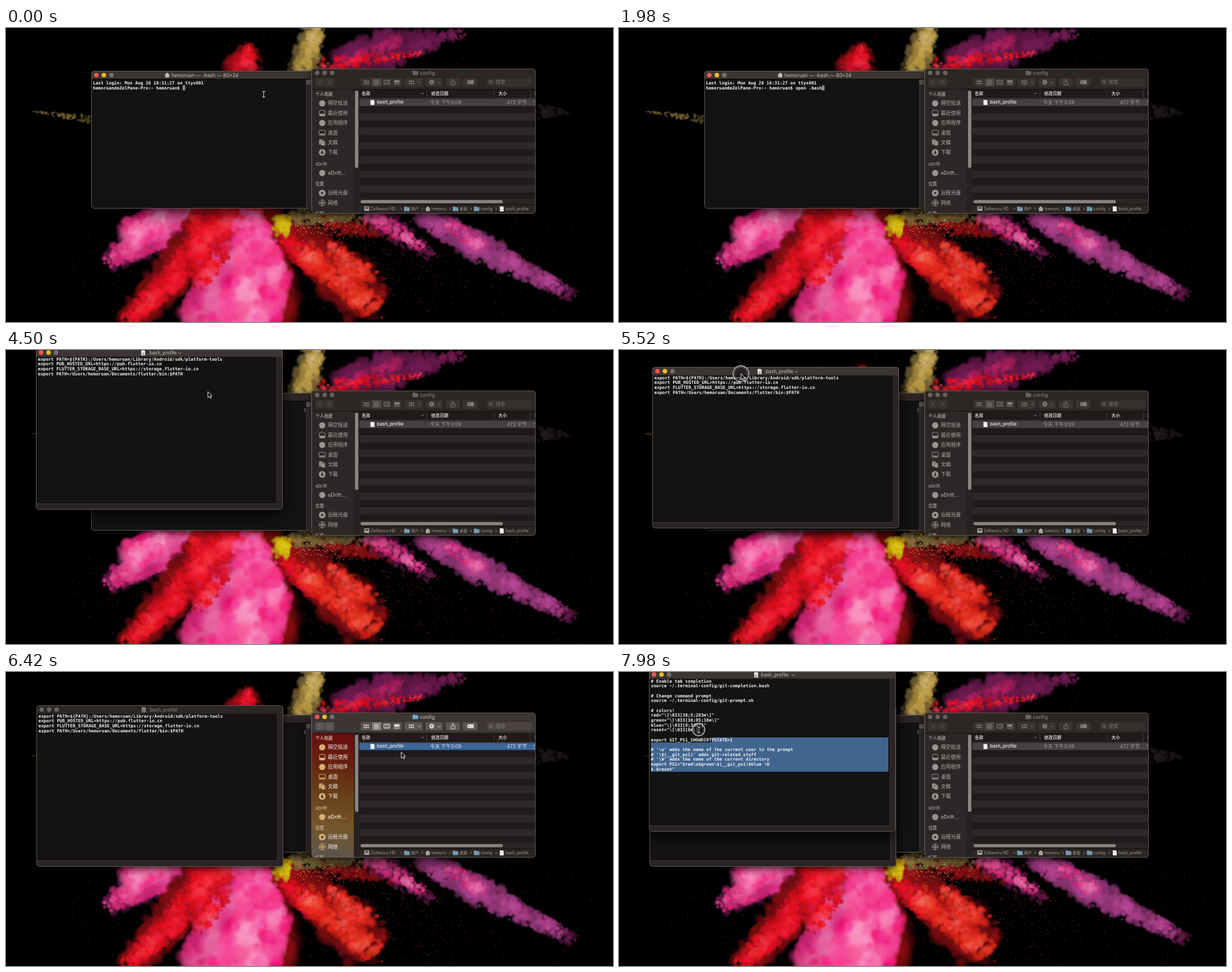
These frames come from a looping animation (1075 by 521 pixels, 8000 ms). An HTML page with a canvas:

```html
<!DOCTYPE html>
<html lang="zh">
<head>
<meta charset="utf-8">
<title>Terminal profile</title>
<style>
html, body { margin: 0; width: 100%; height: 100%; overflow: hidden; background: #000; }
canvas { display: block; }
</style>
</head>
<body>
<canvas id="stage" width="1075" height="521"></canvas>
<script>
const stage = document.getElementById('stage');
let ctx = stage.getContext('2d');
const LOOP = 8000, STEP = 60;
const UI = 'Inter, "Noto Sans CJK SC", "Noto Sans CJK", sans-serif';
const MONO = '"DejaVu Sans Mono", monospace';
const CHAR = 4.667, LINE = 8.67;
const USER = 'hemoruan';
const PROMPT = `${USER}deZelPane-Pro:~ ${USER}$ `;
const COMMAND = 'open .bash_profile';

const SHELL_LINES = [
  `export PATH=\${PATH}:/Users/${USER}/Library/Android/sdk/platform-tools`,
  'export PUB_HOSTED_URL=https://pub.flutter-io.cn',
  'export FLUTTER_STORAGE_BASE_URL=https://storage.flutter-io.cn',
  `export PATH=/Users/${USER}/Documents/flutter/bin:$PATH`
];
const CONFIG_LINES = String.raw`# Enable tab completion
source ~/.terminal-config/git-completion.bash

# Change command prompt
source ~/.terminal-config/git-prompt.sh

# colors!
red="\[\033[38;5;203m\]"
green="\[\033[38;05;38m\]"
blue="\[\033[0;34m\]"
reset="\[\033[0m\]"

export GIT_PS1_SHOWDIRTYSTATE=1

# '\u' adds the name of the current user to the prompt
# '\$(__git_ps1)' adds git-related stuff
# '\W' adds the name of the current directory
export PS1="$red\u$green\$(__git_ps1)$blue \W
$ $reset"`.split('\n');

// Drawing helpers
function rect(x, y, w, h, color, r = 0) {
  ctx.fillStyle = color;
  ctx.beginPath();
  ctx.roundRect(x, y, w, h, r);
  ctx.fill();
}
function frame(x, y, w, h, color, r = 0, lw = 1) {
  ctx.strokeStyle = color;
  ctx.lineWidth = lw;
  ctx.beginPath();
  ctx.roundRect(x, y, w, h, r);
  ctx.stroke();
}
function disc(x, y, r, color) {
  ctx.fillStyle = color;
  ctx.beginPath();
  ctx.arc(x, y, r, 0, 7);
  ctx.fill();
}
function ring(x, y, r, color, lw = 1) {
  ctx.strokeStyle = color;
  ctx.lineWidth = lw;
  ctx.beginPath();
  ctx.arc(x, y, r, 0, 7);
  ctx.stroke();
}
function path(points, x, y, fill, stroke, lw = 1) {
  ctx.beginPath();
  for (let i = 0; i < points.length; i += 2) ctx.lineTo(x + points[i], y + points[i + 1]);
  if (fill) { ctx.closePath(); ctx.fillStyle = fill; ctx.fill(); }
  if (stroke) { ctx.strokeStyle = stroke; ctx.lineWidth = lw; ctx.stroke(); }
}
function text(s, x, y, color, size = 9, weight = 400, family = UI) {
  ctx.font = `${weight} ${size}px ${family}`;
  ctx.textBaseline = 'middle';
  ctx.fillStyle = color;
  ctx.fillText(s, x, y);
}
const code = (s, x, y, color = '#f2f2f2') => text(s, x, y, color, 7.75, 700, MONO);
function page(x, y, color = '#eee') {
  rect(x - 3.5, y - 4.5, 7, 9, color, [0, 2.5, 0, 0]);
}
function folder(x, y, color = '#7398aa') {
  rect(x - 5, y - 4, 5, 3, color, 1);
  rect(x - 5, y - 3, 10, 7, color, 1);
}
function house(x, y, color = '#b4aeab') {
  path([-5, 0, 0, -4.5, 5, 0], x, y, color);
  rect(x - 3.5, y, 7, 4, color);
}
function drive(x, y) {
  rect(x - 4.5, y - 4.5, 9, 8, '#aaa6a4', 1);
  rect(x - 3, y - 3.5, 6, 3.5, '#55504e');
}
function chevron(x, y, color, turn = 0, s = 2.5) {
  ctx.save();
  ctx.translate(x, y);
  ctx.rotate(turn * Math.PI / 2);
  path([-s, -s / 2, 0, s / 2, s, -s / 2], 0, 0, null, color);
  ctx.restore();
}

// Coloured powder wallpaper, drawn once
let seed = 11;
const rnd = () => (seed = seed * 16807 % 2147483647) / 2147483647;
const mix = (a, b, k) => a + (b - a) * k;
const RED = [355, 88, 49], CORAL = [4, 82, 53], DARK = [358, 82, 28];
const PINK = [333, 88, 67], ROSE = [333, 70, 57], PURPLE = [318, 46, 43], WINE = [322, 62, 25];
const YELLOW = [52, 86, 46], SAND = [43, 48, 53], OLIVE = [42, 38, 34], SMOKE = [340, 15, 11];

// Puffs between two points, spread w to w2: cloudy inside, darker and ragged at the rim
function plume([h, s, l], x, y, x2, y2, w, w2) {
  const n = 40 + Math.hypot(x2 - x, y2 - y) * (w + w2) / 28;
  for (let i = 0; i < n; i++) {
    const k = rnd(), r = mix(w, w2, k), a = rnd() * 6.283, d = Math.sqrt(rnd());
    const px = mix(x, x2, k) + r * d * Math.cos(a), py = mix(y, y2, k) + r * d * Math.sin(a);
    const size = 1.5 + r * (.1 + .3 * rnd()) * (1.3 - .6 * d);
    const cloud = Math.sin(px / 13 + py / 29) * Math.sin(py / 16 - px / 37);
    const tone = `${h + rnd() * 8 - 4} ${s}% ${l * (1.12 - .32 * d * d + .14 * cloud)}%`;
    const g = ctx.createRadialGradient(px, py, 0, px, py, size);
    g.addColorStop(0, `hsl(${tone} / .7)`);
    g.addColorStop(.5, `hsl(${tone} / .5)`);
    g.addColorStop(1, `hsl(${tone} / 0)`);
    disc(px, py, size, g);
  }
}
function specks(n, x, y, w, h, hue, light) {
  for (let i = 0; i < n; i++) {
    const s = .5 + rnd() * .9;
    const px = x + w * (rnd() + rnd() - 1), py = y + h * (rnd() + rnd() - 1);
    rect(px, py, s, s, `hsl(${hue + rnd() * 20} 65% ${light * (.5 + rnd() * .7)}%)`);
  }
}
function paintWallpaper() {
  const layer = document.createElement('canvas'), main = ctx;
  layer.width = 1075;
  layer.height = 521;
  ctx = layer.getContext('2d');
  rect(0, 0, 1075, 521, '#000');
  specks(800, 780, 420, 280, 150, 345, 32);
  specks(400, 600, 35, 330, 80, 335, 28);
  specks(300, 190, 430, 150, 100, 350, 28);

  plume(DARK, 420, 78, 428, 40, 42, 14);
  plume(RED, 420, 74, 430, 32, 30, 6);
  plume(WINE, 590, 70, 690, 30, 32, 38);
  plume(WINE, 690, 35, 808, 10, 32, 8);
  plume(ROSE.map((v, i) => i === 2 ? 38 : v), 600, 60, 700, 22, 12, 14);
  plume(RED, 562, 68, 735, 44, 17, 5);
  plume(OLIVE, 548, -4, 525, 78, 22, 28);
  plume(SAND, 554, -4, 524, 78, 15, 20);
  plume(OLIVE, 47, 147, 152, 163, 2, 9);
  plume(SMOKE, 945, 148, 995, 150, 14, 6);

  plume(WINE, 300, 340, 190, 410, 42, 22);
  plume(ROSE, 340, 325, 215, 375, 34, 38);
  plume(ROSE, 300, 345, 185, 412, 40, 14);
  plume(PINK, 270, 335, 230, 365, 25, 24);
  plume(DARK, 460, 330, 420, 515, 32, 95);
  plume(DARK, 385, 335, 225, 515, 48, 28);
  plume(ROSE, 390, 400, 365, 525, 40, 58);
  plume(RED, 440, 328, 340, 345, 22, 28);
  plume(RED, 390, 340, 215, 525, 34, 17);
  plume(PINK, 430, 345, 460, 450, 30, 48);
  plume(PINK, 455, 425, 420, 525, 48, 58);
  plume(RED, 385, 390, 345, 450, 18, 16);

  plume(DARK, 500, 350, 630, 470, 22, 58);
  plume(DARK, 560, 345, 690, 365, 20, 12);
  plume(RED, 490, 375, 560, 430, 16, 26);
  plume(CORAL, 530, 395, 650, 495, 22, 24);
  plume(CORAL, 575, 390, 640, 440, 15, 22);
  plume(WINE, 650, 330, 755, 405, 28, 10);
  plume(ROSE, 645, 330, 740, 388, 18, 9);
  plume(WINE, 735, 330, 1000, 472, 26, 14);
  plume(PURPLE, 735, 330, 860, 400, 18, 30);
  plume(PURPLE, 850, 398, 990, 465, 26, 12);
  plume(ROSE, 780, 345, 840, 385, 10, 15);
  plume(OLIVE, 510, 332, 625, 335, 18, 14);
  plume(YELLOW, 485, 338, 490, 358, 19, 16);
  specks(260, 560, 345, 80, 35, 35, 75);
  specks(420, 610, 420, 160, 100, 0, 48);
  ctx = main;
  return layer;
}
const wallpaper = paintWallpaper();

// Windows
const EDGE = '#625a57';
function windowBox(x, y, w, h, active, bar) {
  ctx.save();
  ctx.shadowColor = 'rgba(0,0,0,.75)';
  ctx.shadowBlur = active ? 26 : 14;
  ctx.shadowOffsetY = active ? 9 : 4;
  rect(x, y, w, h, '#141213', 5);
  ctx.restore();
  rect(x, y, w, bar, active ? '#3c3533' : '#2c2624', [5, 5, 0, 0]);
}
function windowTop(x, y, w, h, active, dx = 9) {
  const colors = active ? ['#fb5850', '#e8bd28', '#76706e'] : Array(3).fill('#68615f');
  colors.forEach((c, i) => disc(x + dx + i * 13.3, y + 7.5, 4, c));
  frame(x + .5, y + .5, w - 1, h - 1, EDGE, 5);
}
function terminal(t) {
  const active = t < 3600, done = t >= 3360, x = 151, y = 76;
  windowBox(x, y, 390, 244, active, 14);
  rect(x, 90, 390, 1, '#090808');
  rect(531, 91, 9, 228, '#302c2b');
  frame(532.5, 92.5, 7, 7, '#777170', 1);
  for (let i = 0; i < 3; i++) rect(534, 94.3 + i * 1.8, 4, .8, '#aaa');
  windowTop(x, y, 390, 244, active);
  const c = active ? '#c9c3c0' : '#8d8785';
  house(285.5, 83.5, c);
  text(`${USER} — -bash — 80×24`, 293, 84, c, 8.6);
  code('Last login: Mon Aug 26 16:31:27 on ttys001', 154, 97.5);
  const typed = done ? COMMAND : COMMAND.slice(0, Math.max(0, Math.floor((t - 720) / 120)));
  code(PROMPT + typed, 154, 106.5);
  if (done) {
    code('[', 150.5, 106.5, '#888');
    code(']', 527, 106.5, '#888');
    code(PROMPT, 154, 116);
  }
  const cx = 154 + (PROMPT.length + (done ? 0 : typed.length)) * CHAR, cy = done ? 111 : 101.5;
  if (active) rect(cx, cy, 4.7, 9, '#8e8b8b');
  else frame(cx + .7, cy + .5, 4, 8, '#8e8b8b');
}

const DARK_INK = '#332a27';
const ICONS = {
  dot: (x, y, c) => disc(x, y, 5.5, c),
  tray(x, y, c) { frame(x - 5, y - 5, 10, 10, c, 2); rect(x - 5, y + 1, 10, 4, c, 1); },
  desk(x, y, c) { frame(x - 5.5, y - 4.5, 11, 9, c, 1); rect(x - 4, y + 1.5, 8, 2, c); },
  docs(x, y, c) { page(x - 2, y - 1, c); page(x + 2, y + 1, c); frame(x - 1.5, y - 3, 6, 8.5, DARK_INK, 0, .6); },
  down(x, y, c) {
    disc(x, y, 6, c);
    rect(x - .9, y - 3.5, 1.8, 4, DARK_INK);
    path([-3, 0, 3, 0, 0, 3.5], x, y, DARK_INK);
  },
  disc(x, y, c) { disc(x, y, 6, c); disc(x, y, 2, DARK_INK); },
  globe(x, y, c) {
    ring(x, y, 5.5, c);
    ring(x, y, 2.6, c);
    rect(x - 5.5, y - .5, 11, 1, c);
    rect(x - .5, y - 5.5, 1, 11, c);
  }
};
const SIDEBAR = [
  ['个人收藏', 118, { 隔空投送: 'dot', 最近使用: 'tray', 应用程序: 'dot', 桌面: 'desk', 文稿: 'docs', 下载: 'down' }],
  ['oDrift', 241.5, { 'oDrift…': 'dot' }],
  ['位置', 277, { 远程光盘: 'disc', 网络: 'globe' }],
  ['标签', 330, {}]
];
function sidebar(active) {
  let fill = '#2d2827';
  if (active) {
    fill = ctx.createLinearGradient(600, 109, 575, 329);
    ['#6a0d10', '#65230f', '#684019', '#76562a', '#5b554d'].forEach((c, i) => fill.addColorStop(i / 4, c));
  }
  rect(541, 108, 76, 221, fill);
  for (const [title, y, items] of SIDEBAR) {
    text(title, 548, y, active ? '#c5ab91' : '#989290', 7.6, 600);
    Object.entries(items).forEach(([name, icon], i) => {
      const iy = y + 15.5 + i * 17.4;
      ICONS[icon](560, iy, active ? '#d5ae72' : '#999391');
      text(name, 570, iy + .3, active ? '#f6f2ee' : '#b3adab', 8.9, 500);
    });
  }
  rect(616, 108, 10, 221, '#272221');
  rect(618, 111, 6, 137, '#898381', 3);
}
function grid(x, y, cols, rows, dx, dy, w, h, color) {
  for (let i = 0; i < cols * rows; i++) rect(x + i % cols * dx, y + Math.floor(i / cols) * dy, w, h, color);
}
function toolbar(active) {
  const ink = active ? '#dedad8' : '#827c7a';
  const fill = active ? '#5a5452' : '#393331';
  folder(725, 79.5, active ? '#69aed0' : '#66625f');
  text('config', 733, 80, active ? '#d8d3d1' : '#918c8a', 8.8);
  for (const [x, w] of [[548, 16], [565, 16], [628, 73.5], [706, 32], [743, 30], [779, 25], [809, 26]])
    rect(x, 89, w, 14.5, fill, 2.5);
  chevron(556, 96, '#77716f', 1);
  chevron(573, 96, '#77716f', -1);
  rect(647, 89, 18, 14.5, active ? '#817b78' : '#4c4644');
  grid(647, 89, 3, 1, 18, 0, .8, 14.5, '#282321');
  grid(633.5, 93, 3, 2, 3.3, 4, 2.3, 2.5, ink);
  grid(713.5, 93, 3, 2, 3.3, 4, 2.3, 2.5, ink);
  grid(651.5, 92.5, 1, 4, 0, 2.3, 9, 1, ink);
  frame(669.5, 92.5, 10, 7, ink);
  grid(672.5, 93, 2, 1, 3.5, 0, 1, 7, ink);
  rect(687.5, 92.5, 9.5, 4.5, ink);
  grid(687.5, 98.3, 4, 1, 2.5, 0, 1.8, 2, ink);
  chevron(732, 96.5, ink);
  disc(754, 96, 3.4, ink);
  for (let i = 0; i < 8; i++) disc(754 + 4 * Math.cos(i * .785), 96 + 4 * Math.sin(i * .785), .9, ink);
  disc(754, 96, 1.2, fill);
  chevron(767, 96.5, ink);
  frame(788, 94.5, 7, 6.5, ink);
  rect(789.5, 93.5, 4, 2, fill);
  rect(791, 91.5, 1, 6.5, ink);
  chevron(791.5, 92, ink, 2, 2);
  rect(816.5, 92.5, 12, 7, ink, [3.5, 0, 0, 3.5]);
  disc(820, 96, 1, fill);
  rect(852, 89, 80, 14.5, active ? '#4a4341' : '#352f2d', 2.5);
  ring(858.5, 95.5, 2.7, '#8b8583');
  path([2, 2, 4, 4], 858.5, 95.5, null, '#8b8583');
  text('搜索', 867, 96.5, '#787270', 8.7);
}
function fileList(active) {
  const row = 12.75;
  rect(626, 108, 312, 195, '#201a1b');
  grid(626, 125.5 + 2 * row, 1, 6, 0, 2 * row, 312, row, '#2d2728');
  rect(626, 124, 312, 1, '#3b3534');
  for (const [s, x] of [['名称', 630], ['修改日期', 753], ['大小', 872], ['种类', 936]]) {
    if (x > 630) rect(x - 8, 110, 1, 13, '#433c3b');
    text(s, x, 116.5, '#d2cdcb', 7.6, 600);
  }
  chevron(737.5, 116, '#999', 2);
  rect(626, 125.5, 312, row, active ? '#3c6697' : '#454041');
  page(649, 132, '#f1f1f1');
  text('bash_profile', 657, 132, '#f1eeed', 8, 500);
  for (const [s, x] of [['今天 下午3:09', 751], ['472 字节', 887], ['文稿', 934]])
    text(s, x, 132, active ? '#e2e6eb' : '#a39e9d', 8.6);
  rect(626, 302.5, 312, 10, '#2a2524');
  rect(628, 305, 252, 5.5, '#898381', 3);
}
function pathBar() {
  const crumbs = [
    ['Zelfanoru HD', 646, drive], ['用户', 717, folder], [USER.slice(0, 6) + ':', 754, house],
    ['桌面', 803, folder], ['config', 840.5, folder], ['bash_profile', 885, page]
  ];
  rect(626, 312.5, 312, 17, '#2b2524');
  rect(626, 312.5, 312, 1, '#141111');
  crumbs.forEach(([s, x, icon], i) => {
    icon(x - 7, 320.5);
    text(s, x, 320.5, '#a39d9a', 7);
    if (i) chevron(x - 17, 320.5, '#a39d9a', -1, 2);
  });
}
function finder(t) {
  const active = t >= 6300 && t < 7140, x = 541, y = 72, w = 397, h = 257;
  windowBox(x, y, w, h, active, 36);
  toolbar(active);
  ctx.save();
  ctx.beginPath();
  ctx.roundRect(x, y, w, h, 5);
  ctx.clip();
  sidebar(active);
  fileList(active);
  pathBar();
  ctx.restore();
  rect(x, 108, w, 1, '#151111');
  windowTop(x, y, w, h, active, 10);
}

const EDITOR_W = 437, EDITOR_H = 286;
function editorFrame(title, x, y, active) {
  windowBox(x, y, EDITOR_W, EDITOR_H, active, 15);
  rect(x + 427, y + 15, 9, 260, '#292423');
  rect(x + 1, y + 275, 435, 10, '#292423', [0, 0, 4, 4]);
  rect(x + 1, y + 275, 426, .8, '#48413f');
  rect(x + 426.5, y + 15, .8, 260, '#48413f');
  windowTop(x, y, EDITOR_W, EDITOR_H, active);
  const c = active ? '#cbc5c2' : '#8e8886';
  page(x + 190, y + 8, active ? '#eee' : c);
  grid(x + 188, y + 8, 1, 2, 0, 2, 4, .8, '#4a4442');
  text(title, x + 198.5, y + 8.3, c, 8.4);
  if (active) chevron(x + 255, y + 8.5, c);
}
const editorText = (lines, x, y) => lines.forEach((s, i) => code(s, x + 3.5, y + 19.7 + i * LINE));

// Motion
const HOME = [53, -3], MIDWAY = [59, 30], PARKED = [54, 59];
const GRIP = ([x, y]) => [x + 157, y + 12];
const DRAG = [[5100, 5520, MIDWAY], [5520, 5820, PARKED]];
const MOVES = [
  [4260, 4860, GRIP(HOME)],
  ...DRAG.map(([a, b, to]) => [a, b, GRIP(to)]),
  [5940, 6300, [700, 142]],
  [6660, 6780, [688, 132]],
  [7080, 7200, [597, 143]],
  [7200, 7680, [256, 192]],
  [7680, 7980, [141, 102]]
];
const PRESSES = [[4920, 5880], [6300, 6400], [6840, 6900], [6960, 7020], [7680, LOOP]];
const progress = (t, a, b) => Math.min(1, Math.max(0, (t - a) / (b - a)));
const follow = (from, moves, t) => moves.reduce(([x, y], [a, b, to]) => {
  const k = progress(t, a, b);
  return [mix(x, to[0], k), mix(y, to[1], k)];
}, from);
const mouse = t => follow([456, 117], MOVES, t);

function zoomAbout(x, y, cx, cy, s) {
  ctx.translate(cx, cy);
  ctx.scale(s, s);
  ctx.translate(-x - EDITOR_W / 2, -y - EDITOR_H / 2);
}
function firstEditor(t) {
  if (t < 3720) return;
  const [x, y] = follow(HOME, DRAG, t), p = progress(t, 3660, 3900);
  ctx.save();
  ctx.globalAlpha = p;
  zoomAbout(x, y, x + EDITOR_W / 2, y + EDITOR_H / 2, mix(.5, 1, p));
  editorFrame('.bash_profile', x, y, t < 6300);
  editorText(SHELL_LINES, x, y);
  ctx.restore();
}
function selection(t, x, y) {
  const [mx, my] = mouse(t - STEP), left = x + 3.5, top = y + 15;
  const line = Math.floor((my - top) / LINE), last = CONFIG_LINES.length - 1;
  if (t < 7740 || line > last) return;
  const from = left + Math.round((mx - left) / CHAR) * CHAR, right = x + 424;
  rect(from, top + line * LINE, right - from, LINE + .2, '#40658f');
  rect(left, top + (line + 1) * LINE, right - left, (last - line) * LINE, '#40658f');
}
function secondEditor(t) {
  if (t <= 7080) return;
  const [x, y] = HOME, p = progress(t, 7080, 7440);
  const cx = x + EDITOR_W / 2, cy = y + EDITOR_H / 2;
  ctx.save();
  zoomAbout(x, y, mix(648, cx, p), mix(131, cy, p), p);
  ctx.globalAlpha = mix(.5, 1, p);
  editorFrame('bash_profile', x, y, p === 1);
  ctx.globalAlpha = (1 - p) * .95;
  path([-98, -130, 0, -130, 98, -42, 98, 130, -98, 130], cx, cy, '#c0bab6');
  ctx.globalAlpha = 1;
  selection(t, x, y);
  editorText(CONFIG_LINES, x, y);
  ctx.restore();
}
function beam(x, y, grow, color) {
  rect(x - grow, y - 5 - grow, 1 + 2 * grow, 11 + 2 * grow, color);
  for (const dy of [-5, 5]) rect(x - 2.5 - grow, y + dy - grow, 6 + 2 * grow, 1 + 2 * grow, color);
}
function pointer(t) {
  if (t >= 840 && t < 3600) return;
  const [x, y] = mouse(t);
  const press = PRESSES.find(([a, b]) => t >= a && t < b);
  if (press) {
    const r = Math.min(14, 8 + (t - press[0]) / 100);
    disc(x, y, r, 'rgba(0,0,0,.35)');
    ring(x, y, r, '#d8d8d8', 1.3);
    ring(x, y, r - 2.5, 'rgba(220,220,220,.55)', .8);
  }
  if (t < 840 || t >= 7140) {
    beam(x, y, 1, '#000');
    beam(x, y, 0, '#fff');
  } else {
    path([0, 0, 0, 10.5, 2.4, 8.3, 4.2, 12, 6, 11.2, 4.3, 7.6, 7.4, 7.4, 0, 0], x, y, '#050505', '#f2f2f2');
  }
}
function draw(now) {
  const t = Math.floor(now % LOOP / STEP) * STEP;
  ctx.drawImage(wallpaper, 0, 0);
  terminal(t);
  finder(t);
  firstEditor(t);
  secondEditor(t);
  pointer(t);
  requestAnimationFrame(draw);
}
requestAnimationFrame(draw);
</script>
</body>
</html>
```
